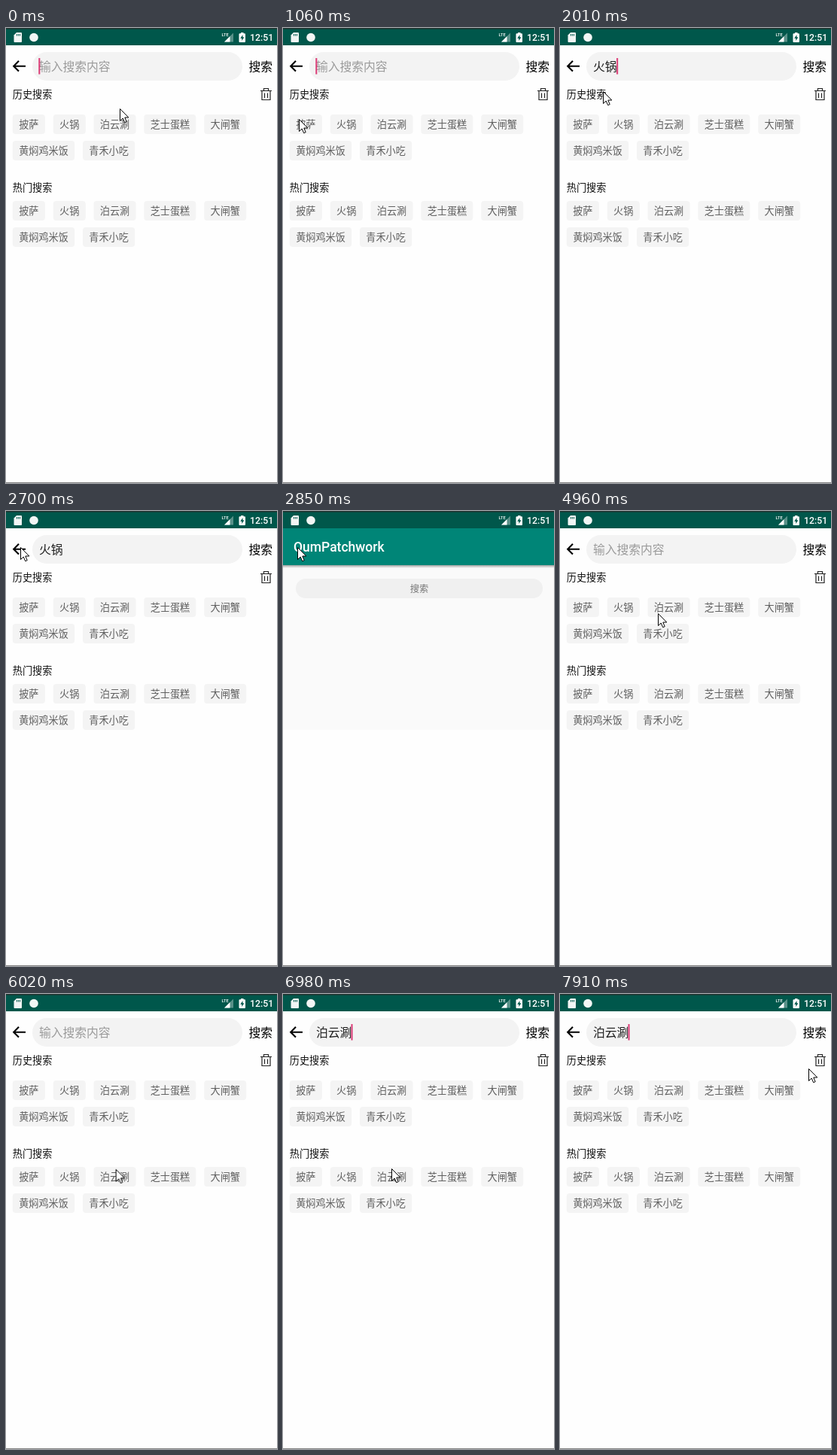
An HTML page for the animation above (8000 ms loop, 360 px wide and 605 px high).

```html
<!DOCTYPE html>
<html lang="zh-CN">
<head>
<meta charset="utf-8">
<title>搜索</title>
<style>
html, body { margin: 0; width: 100%; height: 100%; overflow: hidden; background: #fefefe; }
svg { display: block; width: 100vw; height: 100vh; }
text { font-family: "Noto Sans CJK SC", "Noto Sans CJK", "Noto Sans SC", sans-serif; }
.latin { font-family: Roboto, "Noto Sans", sans-serif; font-weight: 500; fill: #fff; }
.big { font-size: 15.77px; }
.head { font-size: 13.14px; fill: #111; }
.tags text { font-size: 13.14px; fill: #5f5f5f; }
.tags rect { fill: #f4f4f4; }

.home, .hint, .first, .second, .caret { animation: 8s step-end infinite; }
.home { animation-name: home; }
.hint { animation-name: hint; fill: #9b9b9b; }
.first { animation-name: first; }
.second { animation-name: second; }
.caret { animation-name: caret; fill: #d81b60; }
.pointer { animation: pointer 8s step-end infinite; }

@keyframes home {
  0%, 61.9%, 100% { visibility: hidden; }
  35.5% { visibility: visible; }
}
@keyframes hint {
  0%, 61.9% { opacity: 1; }
  25%, 87.1%, 100% { opacity: 0; }
}
@keyframes first {
  0%, 35.5%, 100% { opacity: 0; }
  25% { opacity: 1; }
}
@keyframes second {
  0% { opacity: 0; }
  87.1%, 100% { opacity: 1; }
}
/* half a second on, half a second off, restarted by each new text */
@keyframes caret {
  0%, 9.75%, 22% { transform: translateX(43.4px); opacity: 1; }
  3.125%, 16.625% { transform: translateX(43.4px); opacity: 0; }
  25% { transform: translateX(75.2px); opacity: 1; }
  30.375% { transform: translateX(75.2px); opacity: 0; }
  63.5%, 75.375% { transform: translateX(43.4px); opacity: 1; }
  61.9%, 69%, 82% { transform: translateX(43.4px); opacity: 0; }
  87.1%, 98.8%, 100% { transform: translateX(90.6px); opacity: 1; }
  94% { transform: translateX(90.6px); opacity: 0; }
}
@keyframes pointer {
  0% { transform: translate(151px, 107px); }
  3.125% { transform: translate(140px, 109px); animation-timing-function: steps(6); }
  13.125% { transform: translate(21px, 121px); }
  14.75% { transform: translate(22px, 122px); }
  16.625% { transform: translate(30px, 124px); animation-timing-function: steps(2); }
  20% { transform: translate(66px, 126px); }
  21.625% { transform: translate(70px, 126px); }
  23.25% { transform: translate(67px, 115px); }
  25% { transform: translate(57px, 84px); }
  27% { transform: translate(42px, 68px); }
  28.5% { transform: translate(24px, 54px); }
  30.375% { transform: translate(19px, 48px); }
  37.125% { transform: translate(30px, 56px); animation-timing-function: steps(4); }
  42.375% { transform: translate(93px, 94px); }
  43.875% { transform: translate(112px, 98px); }
  45.375% { transform: translate(130px, 102px); }
  46.875% { transform: translate(140px, 104px); }
  55.25% { transform: translate(139px, 108px); animation-timing-function: steps(4); }
  61.9% { transform: translate(130px, 136px); }
  63.5% { transform: translate(130px, 143px); }
  65.5% { transform: translate(130px, 152px); }
  67% { transform: translate(132px, 164px); animation-timing-function: steps(5); }
  75.375% { transform: translate(149px, 250px); }
  78.625% { transform: translate(148px, 250px); animation-timing-function: steps(5); }
  87.1% { transform: translate(144px, 232px); }
  88.75% { transform: translate(145px, 212px); animation-timing-function: steps(2); }
  92.125% { transform: translate(147px, 164px); }
  94% { transform: translate(204px, 144px); }
  95.5% { transform: translate(258px, 124px); }
  97% { transform: translate(302px, 108px); }
  98.8%, 100% { transform: translate(330px, 99px); }
}
</style>
</head>
<body>
<svg viewBox="0 0 360 605" preserveAspectRatio="none">
  <defs>
    <linearGradient id="shade" x2="0" y2="1">
      <stop stop-color="#000" stop-opacity=".35"/>
      <stop offset="1" stop-color="#000" stop-opacity="0"/>
    </linearGradient>
    <g id="tags" class="tags">
      <rect x="8.8" width="43.1" height="26" rx="4"/><text x="17.2" y="18">披萨</text>
      <rect x="62.7" width="43.1" height="26" rx="4"/><text x="71.1" y="18">火锅</text>
      <rect x="116.5" width="56" height="26" rx="4"/><text x="124.8" y="18">泊云涮</text>
      <rect x="183.3" width="69" height="26" rx="4"/><text x="191.7" y="18">芝士蛋糕</text>
      <rect x="263.2" width="56" height="26" rx="4"/><text x="271.6" y="18">大闸蟹</text>
      <rect x="8.8" y="35" width="82.3" height="26" rx="4"/><text x="17.2" y="53">黄焖鸡米饭</text>
      <rect x="102" y="35" width="69.2" height="26" rx="4"/><text x="110.3" y="53">青禾小吃</text>
    </g>
  </defs>

  <rect width="360" height="605" fill="#fefefe"/>

  <g class="search">
    <path d="M26 50.7H10.5M17 43.8L10.2 50.7L17 57.6" fill="none" stroke="#000" stroke-width="2.1"/>
    <rect x="35" y="32" width="279" height="38" rx="19" fill="#f3f3f3"/>
    <text class="big hint" x="44" y="57">输入搜索内容</text>
    <text class="big first" x="44" y="57" fill="#212121">火锅</text>
    <text class="big second" x="44" y="57" fill="#212121">泊云涮</text>
    <rect class="caret" y="40" width="1.7" height="21.5"/>
    <text class="big" x="322.4" y="57">搜索</text>
    <text class="head" x="8.8" y="93">历史搜索</text>
    <path d="M338 83.5H353M342.5 83V80.5H348.5V83M340 84V95.5H351V84M343.5 86.5V93M347.5 86.5V93" fill="none" stroke="#222" stroke-width="1.2"/>
    <use href="#tags" y="115"/>
    <text class="head" x="8.8" y="217">热门搜索</text>
    <use href="#tags" y="230"/>
  </g>

  <g class="home">
    <rect y="23" width="360" height="582" fill="#fefefe"/>
    <rect y="23" width="360" height="267.5" fill="#fafafa"/>
    <rect y="72" width="360" height="4" fill="url(#shade)"/>
    <rect y="23" width="360" height="49" fill="#008577"/>
    <text class="latin" x="14" y="54.4" font-size="17.5">QumPatchwork</text>
    <rect x="17" y="90" width="328" height="26" rx="13" fill="#f0f0f0"/>
    <text x="181" y="107.7" font-size="12.27" text-anchor="middle" fill="#757575">搜索</text>
  </g>

  <g class="status">
    <rect width="360" height="23" fill="#00574b"/>
    <rect width="360" height="1.5" fill="#20332f"/>
    <path d="M14 6H20Q21 6 21 7V18Q21 19 20 19H11.5Q10.5 19 10.5 18V9.5Z" fill="#f2f6f5"/>
    <path d="M14.5 8V10.5M16.5 8V10.5M18.5 8V10.5" stroke="#00574b"/>
    <circle cx="37" cy="12.5" r="5.8" fill="#f2f6f5"/>
    <text class="latin" x="286.5" y="11" font-size="5.8">LTE</text>
    <path d="M302 6.5V18.5H290Z" fill="#fff" opacity=".35"/>
    <path d="M297.5 11V18.5H290Z" fill="#fff"/>
    <path d="M312 6H315.5V7.3H317Q318 7.3 318 8.3V18Q318 19 317 19H310.5Q309.5 19 309.5 18V8.3Q309.5 7.3 310.5 7.3H312Z" fill="#fff"/>
    <path d="M314.5 9L311.2 13.7H313.3V17L316.4 12.3H314.5Z" fill="#00574b"/>
    <text class="latin" x="324" y="17.3" font-size="12.3">12:51</text>
  </g>

  <rect y="604" width="360" height="1" fill="#858585"/>

  <path class="pointer" d="M.5 .5V16.5L4.2 13L6.7 18.7L9.2 17.6L6.8 12H11.8Z" fill="#fff" stroke="#000"/>
</svg>
</body>
</html>
```
